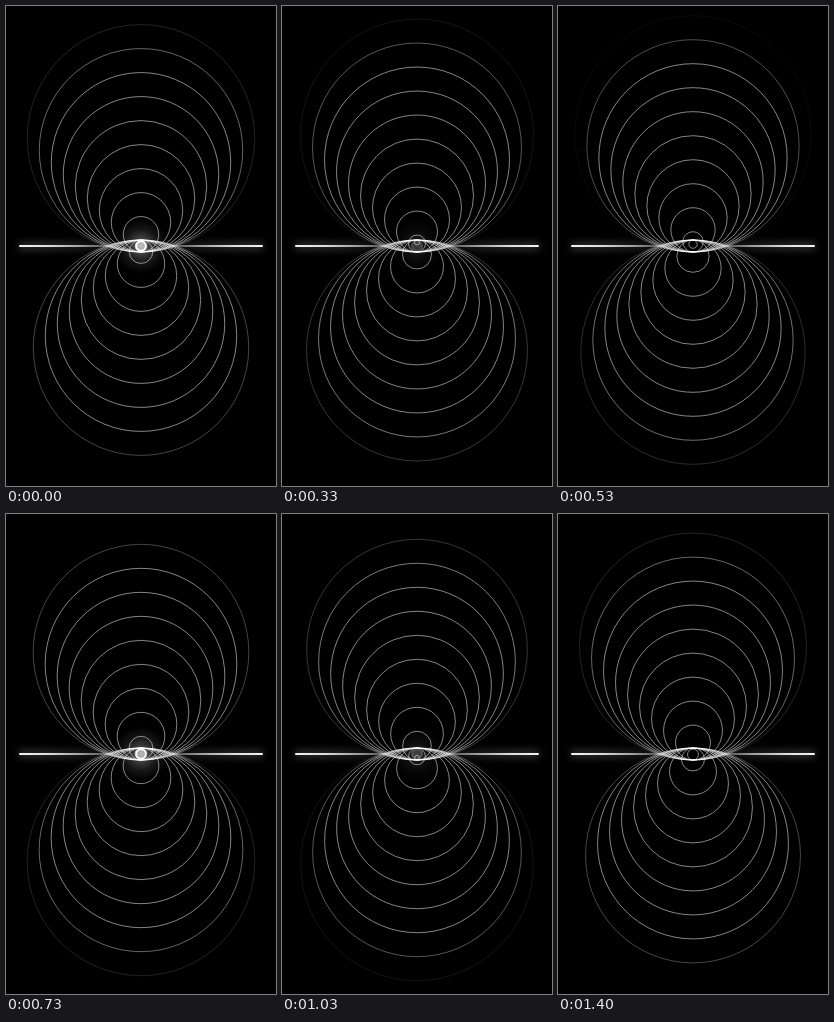
An HTML page for the animation above (1430 ms loop, 270 px wide and 480 px high).

```html
<!DOCTYPE html>
<html lang="en">
<head>
<meta charset="utf-8">
<title>Field rings</title>
<style>
  html, body { margin: 0; width: 100%; height: 100%; overflow: hidden; background: #000; }
  svg { display: block; width: 100vw; height: 100vh; }
</style>
</head>
<body>
<svg id="stage" viewBox="0 0 270 480">
  <defs>
    <linearGradient id="bar" gradientUnits="userSpaceOnUse" x1="13" y1="0" x2="257" y2="0">
      <stop offset="0" stop-color="#fff" stop-opacity=".95"/>
      <stop offset=".12" stop-color="#fff" stop-opacity=".85"/>
      <stop offset=".25" stop-color="#fff" stop-opacity=".6"/>
      <stop offset=".34" stop-color="#fff" stop-opacity=".35"/>
      <stop offset=".42" stop-color="#fff" stop-opacity="0"/>
      <stop offset=".58" stop-color="#fff" stop-opacity="0"/>
      <stop offset=".66" stop-color="#fff" stop-opacity=".35"/>
      <stop offset=".75" stop-color="#fff" stop-opacity=".6"/>
      <stop offset=".88" stop-color="#fff" stop-opacity=".85"/>
      <stop offset="1" stop-color="#fff" stop-opacity=".95"/>
    </linearGradient>
    <radialGradient id="halo">
      <stop offset="0" stop-color="#fff" stop-opacity=".5"/>
      <stop offset=".3" stop-color="#fff" stop-opacity=".24"/>
      <stop offset=".6" stop-color="#fff" stop-opacity=".09"/>
      <stop offset="1" stop-color="#fff" stop-opacity="0"/>
    </radialGradient>
    <filter id="wide" filterUnits="userSpaceOnUse" x="0" y="215" width="270" height="50">
      <feGaussianBlur stdDeviation="4"/>
    </filter>
    <filter id="fine" filterUnits="userSpaceOnUse" x="0" y="230" width="270" height="20">
      <feGaussianBlur stdDeviation=".45"/>
    </filter>
  </defs>
  <rect width="270" height="480" fill="#000"/>
  <rect x="13" y="238" width="244" height="4" fill="url(#bar)" opacity=".4" filter="url(#wide)"/>
  <rect x="13" y="239" width="244" height="2" rx="1" fill="url(#bar)" filter="url(#fine)"/>
  <g id="rings" fill="none" stroke="#fff" stroke-width=".95"></g>
  <g id="flash">
    <circle cx="135" cy="240" r="28" fill="url(#halo)"/>
    <circle cx="135" cy="240" r="4.8" fill="#fff" fill-opacity=".5" stroke="#fff" stroke-width="2"/>
  </g>
</svg>
<script>
  const LOOP = 1430, STEP = 12, COUNT = 10, MAX = STEP * COUNT;
  const CX = 135, CY = 240, OVERLAP = 6, LAG = .025, ALPHA = .55;
  const NS = 'http://www.w3.org/2000/svg';
  const group = document.getElementById('rings');
  const flash = document.getElementById('flash');
  const clamp = v => Math.max(0, Math.min(1, v));

  // dir -1 opens upwards, dir 1 opens downwards
  const rings = [];
  for (const dir of [-1, 1])
    for (let k = 0; k < COUNT; k++) {
      const el = document.createElementNS(NS, 'circle');
      el.setAttribute('cx', CX);
      group.appendChild(el);
      rings.push({ dir, k, el });
    }

  function draw(t) {
    const p = t / LOOP;
    for (const { dir, k, el } of rings) {
      const phase = (p + (dir < 0 ? .5 : 1) - LAG) % 1;
      const r = STEP * (k + phase);
      el.setAttribute('r', r);
      el.setAttribute('cy', CY + dir * (r - OVERLAP));
      el.setAttribute('opacity', ALPHA * clamp((MAX - r) / 24) * clamp(r / 2));
    }
    // a pulse each time a ring passes the centre
    const beat = (p * 2) % 1;
    flash.setAttribute('opacity', clamp(1 - beat * 1.5));
  }

  const start = performance.now();
  function tick() {
    draw((performance.now() - start) % LOOP);
    requestAnimationFrame(tick);
  }
  tick();
</script>
</body>
</html>
```
